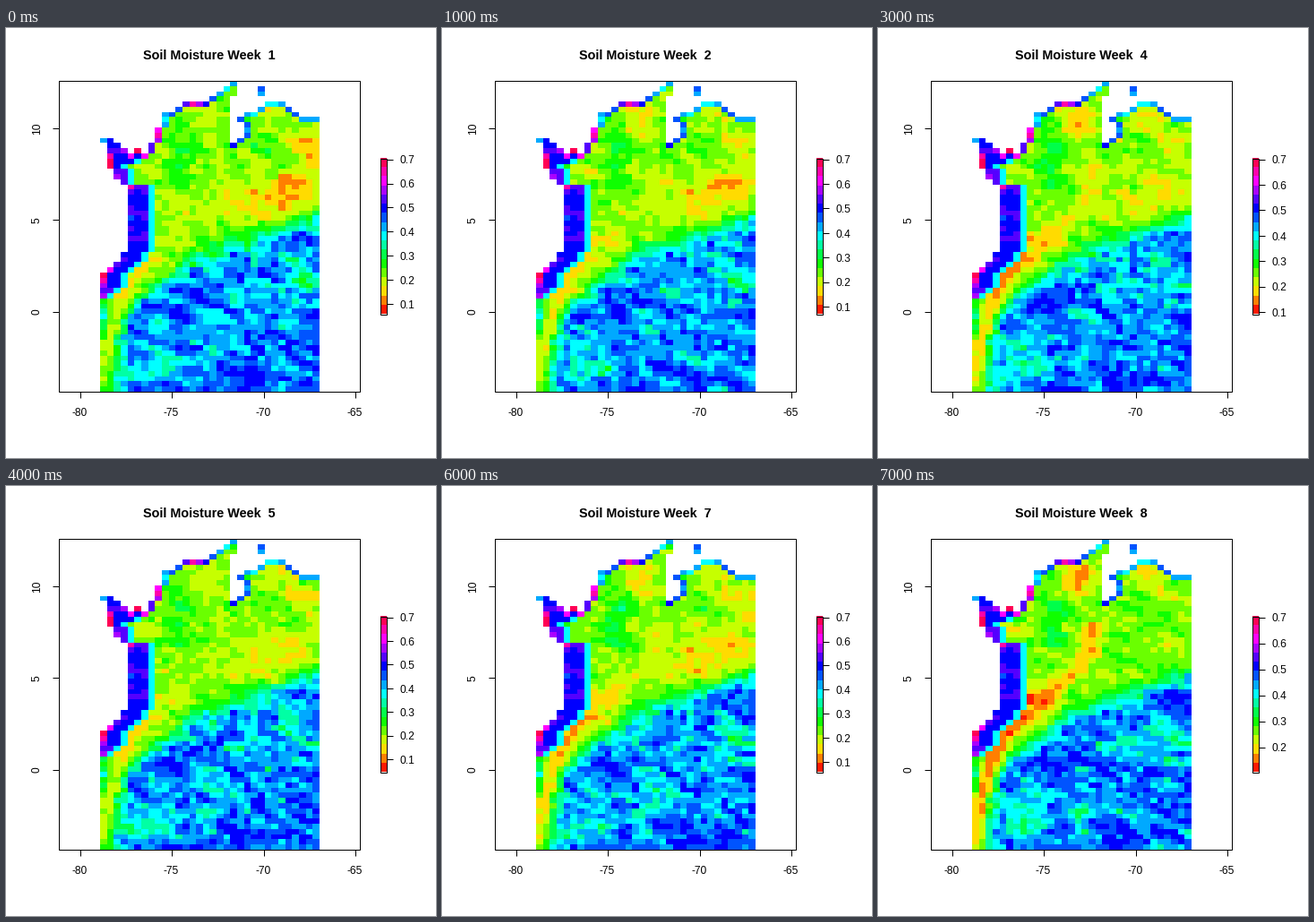
These frames come from a looping animation (480 px wide and 480 px high, 8000 ms). A matplotlib script:

```python
import numpy as np
import matplotlib.pyplot as plt
from matplotlib.animation import FuncAnimation
from matplotlib.colors import hsv_to_rgb
from matplotlib.patches import Rectangle

plt.rcParams["font.family"] = "Liberation Sans"

SIZE, DPI = 480, 72
ROWS, COLS, WEEKS = 60, 32, 8
LEFT, RIGHT, TOP, BOTTOM = 105, 349.5, 59, 406
CELL_W, CELL_H = (RIGHT - LEFT) / COLS, (BOTTOM - TOP) / ROWS

col, row = np.meshgrid(np.arange(COLS), np.arange(ROWS))
px = LEFT + (col + 0.5) * CELL_W
py = TOP + (row + 0.5) * CELL_H

# Moisture is a palette level: 0 red (dry) to 16 crimson (wet).
LEVELS = np.arange(17)
hues = np.interp(LEVELS, [0, 1, 4, 8, 11, 16], [6, 30, 95, 180, 240, 340])
PALETTE = hsv_to_rgb(np.stack([hues / 360, np.ones(17), np.ones(17)], axis=-1))

# Regions: x, y, radius x, radius y, then the level shift:
# constant, with dry plains, with dry mountains.
REGIONS = [
    (318, 174, 24, 14, -1.3, -1.0, 0.4),   # driest savanna
    (285, 192, 58, 30, 0.3, -2.0, 0),      # plains
    (340, 132, 18, 22, -0.8, -0.9, 0.5),   # eastern plains
    (222, 103, 20, 16, -0.8, 0, -2.0),     # north coast
    (295, 104, 20, 11, -1.2, 0, -1.3),     # lake shore
    (192, 150, 14, 30, 1.6, 0, 0.8),       # river valley
    (175, 240, 22, 20, -0.5, 0, -2.4),     # foothills
    (325, 240, 24, 12, 1.0, -0.5, 1.2),    # eastern wetland
    (322, 280, 20, 16, -1.8, 0, 0),        # forest clearing
    (178, 311, 40, 14, 1.8, 0, 0),         # western basin
    (155, 357, 30, 24, -0.7, 0, -1.6),     # western lowland
    (300, 385, 55, 20, 1.4, 0, 0),         # southern basin
]
WET_SHORES = [(208, 85), (170, 117), (147, 140), (117, 148), (109, 277)]


def bump(x, y, rx, ry):
    return np.exp(-((px - x) / rx) ** 2 - ((py - y) / ry) ** 2)


def streaks(seed, slope):
    """Noise drawn out eastward, sinking by slope rows per two columns."""
    n = np.random.RandomState(seed).normal(size=(ROWS, COLS))
    n = n + 0.7 * np.roll(n, 1, 1) + 0.6 * np.roll(n, (slope, 2), (0, 1))
    n = n + 0.5 * np.roll(n, 1, 0)
    return n / n.std()


# Coastlines: northernmost row per column, westernmost column per row.
north = np.rint(np.interp(
    col, [0, 1, 4, 5, 6, 7, 8, 9, 11, 12, 15, 19, 20, 22, 24, 26, 29],
    [11, 11, 14, 13, 14, 12, 9, 6, 5, 4, 4, 0, 7, 6, 4, 4, 7]))
west = np.rint(np.interp(
    row, [11, 12, 16, 20, 32, 34, 37], [0, 1, 1, 4, 4, 2.9, 0]))
lake = ((col == 19) & (row > 2) & (row < 12)) | ((col == 20) & (row > 7) & (row < 11))
islet = (col == 23) & (row > 0) & (row < 3)
land = ((row >= north) & (col >= west) & ~lake) | islet

padded = np.pad(land, 1, constant_values=True)
padded[0] = padded[:, 0] = False
shore = land & ~(padded[1:-1, :-2] & padded[:-2, 1:-1]) & (row < 42)

front = np.interp(px, [130, 165, 200, 250, 300, 349], [315, 293, 263, 243, 228, 210])
wet_side = 1 / (1 + np.exp((front - py) / 6))
terrain = streaks(3, 1)
shore_noise = streaks(8, 0)
ridge_col = np.interp(row, [16, 22, 27, 32, 36, 40, 45, 50, 59],
                      [17, 16.5, 13, 9, 5.5, 3, 1.8, 0.5, 0])
ridge = np.exp(-((col - ridge_col) / 1.7) ** 2) * (row > 15)


def season(week):
    """Dryness of the plains and of the mountains, 0 to 1."""
    plains = np.interp(week, [0, 2, 4, 6, 7], [1, 0.5, 0.5, 0.8, 0])
    mountains = np.interp(week, [0, 1, 3, 4, 6, 7], [0.1, 0.3, 0.7, 0.2, 0.6, 1])
    return plains, mountains


def add_coast(field):
    hot = sum(bump(x, y, 9, 9) for x, y in WET_SHORES)
    wet = np.where(row < 12, 9.3, 11.8) + 5 * hot + 0.8 * shore_noise
    field = np.where(shore, wet, field)
    # Wet Pacific strip, fading over one cell.
    width = np.interp(row, [11, 15, 16, 19, 20, 36, 40, 42], [5, 4, 2, 1, 3, 3, 2, 0])
    depth = col - west
    strip = (row > 10) & (row < 42) & ~shore
    field = np.where(strip & (depth < width + 1), 8.3, field)
    return np.where(strip & (depth < width), 11.3 + 0.4 * shore_noise, field)


def map_image(week):
    plains, mountains = season(week)
    field = 3.9 + 5.4 * wet_side
    for x, y, rx, ry, steady, by_plains, by_mountains in REGIONS:
        shift = steady + by_plains * plains + by_mountains * mountains
        field = field + shift * bump(x, y, rx, ry)
    rough = 0.6 * terrain + 0.45 * streaks(20 + week, 1)
    field = field + rough * (0.75 + 0.75 * wet_side)
    # Dry ridge, strongest along the south-west edge.
    crest = 2.7 - 1.9 * mountains + np.clip((row - 48) / 7, 0, 1.6)
    hold = np.where(row > 33, 1, 0.2 + 0.6 * mountains)
    field = field + hold * ridge * (crest + 0.3 * terrain - field)
    field = add_coast(np.clip(field, 0, 11.3))
    return np.where(land[..., None], PALETTE[np.clip(np.rint(field), 0, 16).astype(int)], 1.0)


fig = plt.figure(figsize=(SIZE / DPI, SIZE / DPI), dpi=DPI, facecolor="white")
ax = fig.add_axes([0, 0, 1, 1])
ax.axis("off")


def line(x, y):
    return ax.plot(x, y, color="black", lw=1, solid_capstyle="butt", zorder=4)[0]


def frame(x0, y0, x1, y1):
    ax.add_patch(Rectangle((x0, y0), x1 - x0, y1 - y0, fill=False, ec="black",
                           lw=1, zorder=4))


def image(x0, x1, y0, y1, data):
    return ax.imshow(data, extent=(x0, x1, y1, y0), aspect="auto",
                     interpolation="nearest", zorder=2)


land_map = image(LEFT, RIGHT, TOP, BOTTOM, map_image(0))
image(418, 425, 146, 319.5, PALETTE[::-1, None])
ax.set(xlim=(0, SIZE), ylim=(SIZE, 0))

frame(58.5, 58.5, 395, 405.5)
frame(418, 145.5, 425, 319.5)
for value in range(-80, -64, 5):
    x = 82.5 + (value + 80) * 20.5
    line([x, x], [406, 413])
    ax.text(x - 0.5, 433, str(value), size=12, ha="center", va="baseline")
for value in range(0, 11, 5):
    y = 316.8 - value * 20.5
    line([51.5, 58.5], [y, y])
    ax.text(41, y, str(value), size=12, rotation=90, ha="right", va="center")

title = ax.text(227, 35, "", size=14.4, weight="bold", ha="center", va="baseline")
marks = []
for i in range(1, 8):
    label = ax.text(439, 0, f"0.{i}", size=12, ha="left", va="baseline")
    marks.append((i, line([425, 432], [0, 0]), label))


def draw(week):
    land_map.set_data(map_image(week))
    title.set_text(f"Soil Moisture Week  {week + 1}")
    lowest = np.interp(week, [0, 3, 4, 6, 7], [308, 317, 305, 308, 320.5])
    for i, tick, label in marks:
        y = 146.7 + (lowest - 146.7) * (7 - i) / 6
        tick.set_ydata([y, y])
        label.set_y(y + 4.7)
        for part in (tick, label):
            part.set_visible(bool(y < 320))
    return [land_map, title]


anim = FuncAnimation(fig, draw, frames=WEEKS, interval=1000, repeat=True, repeat_delay=0)
plt.show()
```
